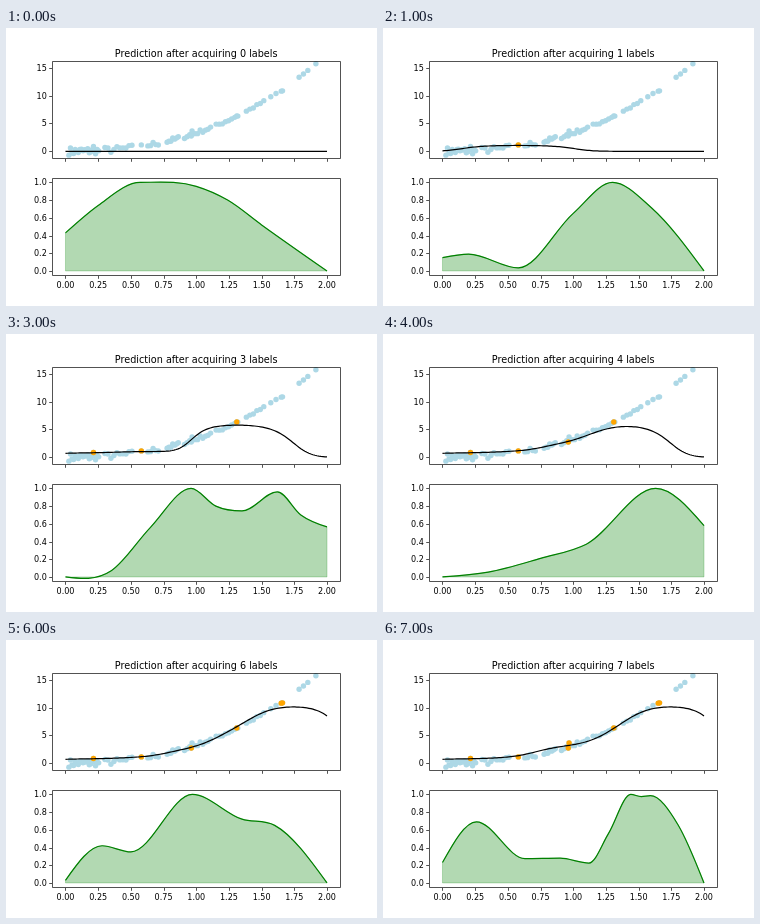
An HTML page for the animation above (8000 ms loop, 371 by 278 pixels).

```html
<!DOCTYPE html>
<html lang="en">
<head>
<meta charset="utf-8">
<title>Active learning</title>
<style>
  html, body { margin: 0; height: 100%; overflow: hidden; background: #fff; }
  svg { display: block; width: 371px; height: 278px; }
  text { font: 8.06px "DejaVu Sans", sans-serif; text-anchor: middle; }
  .title { font-size: 9.67px; }
  .end { text-anchor: end; }
  .axis { fill: none; stroke: #000; stroke-opacity: .68; }
  .pool { fill: #add8e6; }
  .label { fill: #ffa500; }
  .line { fill: none; stroke: #000; stroke-width: 1.22; }
  .score { stroke: #008000; }
  .area { fill: #008000; fill-opacity: .3; stroke: #008000; stroke-opacity: .3; stroke-width: .8; }
  .step { opacity: 0; animation: show 8s step-end infinite; }
  @keyframes show { 0% { opacity: 1; } 12.5%, 100% { opacity: 0; } }
</style>
</head>
<body>
<svg id="plot" viewBox="0 0 371 278"></svg>
<script>
const plot = document.getElementById('plot');
const NS = 'http://www.w3.org/2000/svg';

function add(parent, tag, attrs, text) {
  const el = document.createElementNS(NS, tag);
  for (const k in attrs) el.setAttribute(k, attrs[k]);
  if (text) el.textContent = text;
  return parent.appendChild(el);
}

// Data to pixels: shared x, one y scale per plot
const xAt = x => 59.48 + 130.76 * x;
const valueY = v => 123.3 - 5.57 * v;
const scoreY = s => 242.95 - 88.58 * s;

const dot = (parent, cls, [x, y]) =>
  add(parent, 'circle', { class: cls, cx: xAt(x), cy: valueY(y), r: 2.7 });

let seed = 7;
function random() {
  seed = (seed * 16807) % 2147483647;
  return seed / 2147483647;
}

// Noisy power law, sampled in runs of [from, to, count]
const runs = [
  [.02, .26, 20], [.29, .52, 10], [.62, .72, 5], [.77, .87, 7], [.9, 1.12, 11],
  [1.14, 1.33, 8], [1.37, 1.53, 6], [1.55, 1.63, 2], [1.77, 1.87, 3], [1.9, 1.93, 1]
];
const pool = runs.flatMap(([from, to, n]) => Array.from({ length: n }, (_, i) => {
  const x = from + (to - from) * (i + .5) / n;
  const noise = (random() - .5) * 1.4 * (1 - x / 2);
  return [x, 3.3 * x ** 2.4 + noise];
}));

// Labels in the order they are acquired
const labels = [
  [.58, 1.15], [1.31, 6.35], [.214, .85], [.962, 2.75], [1.65, 10.8], [1.66, 10.85], [.968, 3.65]
];

// Kernel regression pulled towards zero by a small prior weight
function predict(x, known) {
  let sum = 0, weight = .1;
  for (const [lx, ly] of known) {
    const k = Math.exp(-((x - lx) ** 2) / .07);
    sum += k * ly;
    weight += k;
  }
  return sum / weight;
}

function predictionPath(known) {
  const pts = Array.from({ length: 131 }, (_, i) => {
    const x = i / 65;
    return `${xAt(x)},${valueY(predict(x, known)).toFixed(2)}`;
  });
  return 'M' + pts.join('L');
}

// Turning points of the acquisition score for each step
const scores = [
  [[0, .43], [.25, .74], [.57, 1], [1, .955], [1.24, .8], [1.5, .52], [2, 0]],
  [[0, .15], [.2, .19], [.58, .035], [1, .65], [1.3, 1], [1.6, .71], [2, 0]],
  [[0, .88], [.2, 1], [.5, .59], [.71, .22], [.95, .35], [1.36, .145], [1.62, .31], [1.82, .09], [2, 0]],
  [[0, 0], [.35, .07], [.65, .56], [.96, 1], [1.15, .8], [1.35, .745], [1.62, .96], [1.8, .7], [2, .565]],
  [[0, 0], [.35, .055], [.75, .21], [1.1, .37], [1.63, 1], [2, .58]],
  [[0, 0], [.28, .145], [.5, .11], [.8, .3], [1, .385], [1.2, .44], [1.4, .79], [1.65, 1], [2, .39]],
  [[0, .03], [.28, .42], [.5, .35], [.97, 1], [1.35, .72], [1.6, .65], [2, 0]],
  [[0, .23], [.26, .69], [.63, .275], [.9, .28], [1.12, .225], [1.27, .56], [1.44, 1], [1.52, .975],
   [1.59, .985], [1.8, .66], [2, 0]]
];

// Smooth path through points, level at every local extremum
function curve(p) {
  const n = p.length - 1;
  const dx = [], s = [];
  for (let i = 0; i < n; i++) {
    dx[i] = p[i + 1][0] - p[i][0];
    s[i] = (p[i + 1][1] - p[i][1]) / dx[i];
  }
  const m = [];
  for (let i = 1; i < n; i++) {
    m[i] = s[i - 1] * s[i] <= 0 ? 0
      : (s[i - 1] * dx[i] + s[i] * dx[i - 1]) / (dx[i - 1] + dx[i]);
  }
  m[0] = 1.5 * s[0] - m[1] / 2;
  m[n] = 1.5 * s[n - 1] - m[n - 1] / 2;
  const at = (x, y) => `${xAt(x)},${scoreY(y)}`;
  let d = 'M' + at(...p[0]);
  for (let i = 0; i < n; i++) {
    const h = dx[i] / 3, [x0, y0] = p[i], [x1, y1] = p[i + 1];
    d += `C${at(x0 + h, y0 + m[i] * h)} ${at(x1 - h, y1 - m[i + 1] * h)} ${at(x1, y1)}`;
  }
  return d;
}

[...pool, ...labels].forEach(p => dot(plot, 'pool', p));

scores.forEach((score, i) => {
  const g = add(plot, 'g', { class: 'step', style: `animation-delay:${i - 8}s` });
  const known = labels.slice(0, i);
  known.forEach(p => dot(g, 'label', p));
  add(g, 'path', { class: 'line', d: predictionPath(known) });
  const d = curve(score);
  add(g, 'path', { class: 'area', d: `${d}V${scoreY(0)}H${xAt(0)}Z` });
  add(g, 'path', { class: 'line score', d });
  add(g, 'text', { class: 'title', x: 190.2, y: 29 }, `Prediction after acquiring ${i} labels`);
});

// Axes with ticks snapped to the pixel grid
const snap = v => Math.round(v) + .5;
function axes(top, bottom, yTicks, yAt, showX) {
  let d = `M46.5,${top}H334.5V${bottom}H46.5Z`;
  for (let x = 0; x <= 2; x += .25) {
    d += `M${snap(xAt(x))},${bottom + .5}v2.8`;
    if (showX) add(plot, 'text', { x: xAt(x), y: 260 }, x.toFixed(2));
  }
  for (const t of yTicks) {
    const y = yAt(+t);
    d += `M46,${snap(y)}h-2.8`;
    add(plot, 'text', { class: 'end', x: 40.8, y: Math.round(y + 3) }, t);
  }
  add(plot, 'path', { class: 'axis', d });
}
axes(33.5, 130.5, ['0', '5', '10', '15'], valueY, false);
axes(150.5, 247.5, ['0.0', '0.2', '0.4', '0.6', '0.8', '1.0'], scoreY, true);
</script>
</body>
</html>
```
